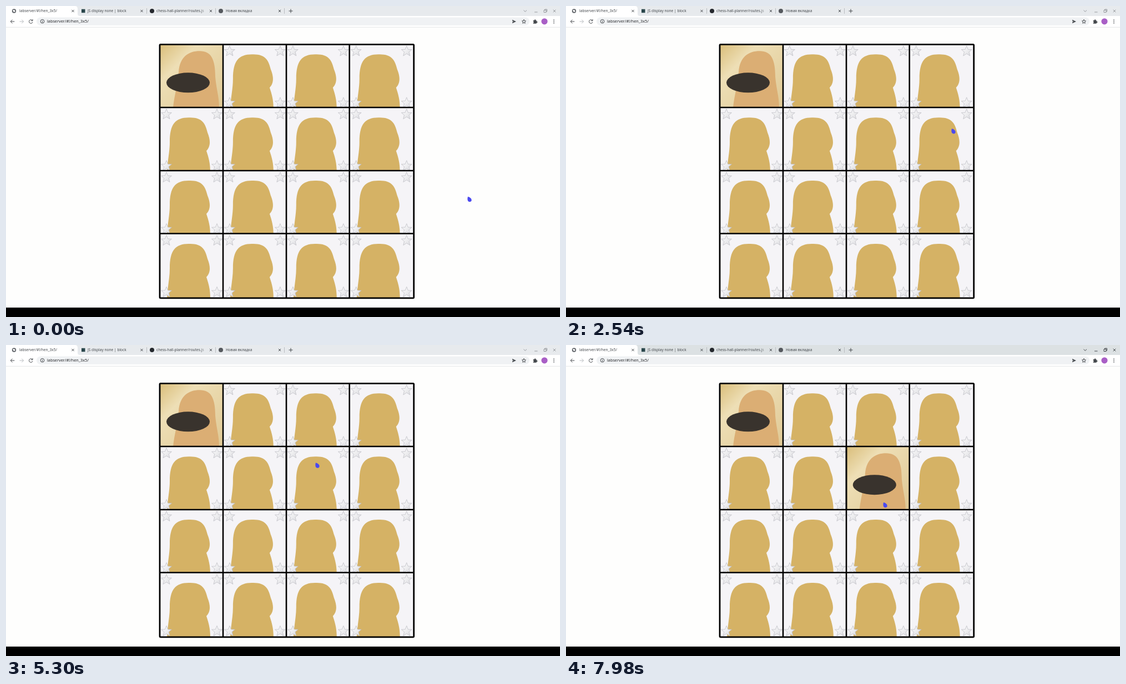
Write an HTML page that moves like this. It is 998 px wide and 561 px high and loops after 8000 ms.

```html
<!DOCTYPE html>
<html lang="ru">
<head>
<meta charset="utf-8">
<style>
  html, body { margin: 0; width: 100%; height: 100%; overflow: hidden; background: #fefefd; }
  svg { display: block; width: 998px; height: 561px; }
  text { font: 6.58px "Noto Sans", sans-serif; fill: #45494d; }
  .url { font-size: 7.25px; fill: #26282b; }
  .line { fill: none; stroke: #43474b; stroke-width: 1; }
  .soft { stroke: #b9bcc0; }
  #strip { fill: #e7eaed; }
  #controls { stroke: #96999d; }
  .focused #strip { fill: #dce1e3; }
  .focused #controls { stroke: #43474b; }
</style>
</head>
<body>
<svg id="stage" viewBox="0 0 998 561">
  <defs>
    <linearGradient id="room" x2="1" y2="1">
      <stop offset="0" stop-color="#d9bd79"/>
      <stop offset=".3" stop-color="#eedfb6"/>
      <stop offset="1" stop-color="#dfc894"/>
    </linearGradient>
    <linearGradient id="silver" x2="1" y2="1">
      <stop offset="0" stop-color="#fff"/>
      <stop offset="1" stop-color="#dcdce0"/>
    </linearGradient>
    <linearGradient id="fade">
      <stop offset="0" stop-color="#fff"/>
      <stop offset=".87" stop-color="#fff"/>
      <stop offset="1" stop-color="#000"/>
    </linearGradient>
    <mask id="titleFade"><rect x="268" width="94" height="18" fill="url(#fade)"/></mask>
    <path id="star" d="M0-9.5 2.6-3 9.4-2.8 4.2 1.6 6 8.5 0 4.7-6 8.5-4.2 1.6-9.4-2.8-2.6-3Z"
      fill="url(#silver)" stroke="#bfbfc6" stroke-width=".8"/>
    <path id="close" class="line" d="M-2.1-2.1 2.1 2.1M2.1-2.1-2.1 2.1"/>
    <g id="back">
      <rect width="117" height="117" fill="#f5f4f7"/>
      <path d="M13 117C14 95 18 80 18 62 18 30 28 18 52 18 76 17 82 28 86 45 93 62 90 72 84 78 88 90 91 100 91 117Z" fill="#d5b265"/>
      <use href="#star" x="12" y="12"/><use href="#star" x="103" y="12"/>
      <use href="#star" x="12" y="105"/><use href="#star" x="103" y="105"/>
    </g>
    <g id="front">
      <rect width="114" height="114" fill="url(#room)"/>
      <path d="M24 114C26 92 32 76 34 50 36 22 52 12 72 12S100 26 100 58C102 82 107 94 107 114Z" fill="#dbae74"/>
      <ellipse cx="51" cy="69" rx="39" ry="18" fill="#39332d"/>
    </g>
  </defs>

  <rect id="strip" width="998" height="18"/>
  <path d="M0 0H124Q129 0 129 5V14Q129 18 133 18H0Z" fill="#fff"/>
  <rect y="18" width="998" height="20" fill="#fff"/>
  <path class="line" style="stroke:#e4e6e8" d="M0 38.3H998"/>
  <rect x="55" y="20.5" width="888" height="14.5" rx="7.2" fill="#f0f2f4"/>
  <path class="line soft" stroke-width=".6" d="M253.5 4V14M377.5 4V14M501.5 4V14"/>

  <circle cx="14.5" cy="9" r="3.7" fill="#5f6368"/>
  <path d="M12 8Q14 6 16 8T14 11Z" fill="#fff"/>
  <rect x="136" y="5.7" width="6.5" height="6.5" fill="#29464b"/>
  <circle cx="263" cy="9" r="4" fill="#24282d"/>
  <circle cx="387" cy="9" r="4" fill="#55595e"/>
  <text x="24" y="11.4">labserver/#!/hen_3x5/</text>
  <text x="147" y="11.4">JS display none | block</text>
  <text x="271" y="11.4" mask="url(#titleFade)">chess-hall-planner/routes.js</text>
  <text x="396" y="11.4">Новая вкладка</text>
  <use href="#close" x="120.5" y="9"/><use href="#close" x="244.5" y="9"/>
  <use href="#close" x="369" y="9"/><use href="#close" x="493" y="9"/>
  <path class="line" d="M509.5 9H516.5M513 5.5V12.5"/>
  <path class="line" id="controls" d="M932.5 7.7 935.2 10.3 938 7.7M952 11H957.5M969 7.5H973V11.5H969ZM970.5 7.5V6H974.5V10H973M985.7 6.7 990.3 11.3M990.3 6.7 985.7 11.3"/>

  <path class="line" d="M15.3 28H8.3M11.5 24.7 8.2 28 11.5 31.3"/>
  <path class="line soft" d="M24.5 28H31.5M28.3 24.7 31.6 28 28.3 31.3"/>
  <path class="line" d="M47.3 25.8A3.3 3.3 0 1 0 48 29M48 24V26.7H45.3"/>
  <circle class="line" stroke-width=".8" cx="65.5" cy="27.7" r="3.3"/>
  <path class="line" d="M65.5 25.7V26.4M65.5 27.2V29.7"/>
  <text class="url" x="74" y="30.4">labserver/#!/hen_3x5/</text>
  <path d="M912 24.8 919 28 912 31.2 912.5 28.6 915.5 28 912.5 27.4Z" fill="#43474b"/>
  <path class="line" stroke-width=".8" d="M933 24.4 934 26.8 936.5 27 934.6 28.7 935.2 31.2 933 29.9 930.8 31.2 931.4 28.7 929.5 27 932 26.8Z"/>
  <path d="M949.8 26H952A1.2 1.2 0 1 1 954.2 26H955.7V28A1.2 1.2 0 1 1 955.7 30V31.7H949.8V30A1 1 0 1 0 949.8 28Z" fill="#43474b"/>
  <circle cx="970" cy="27.8" r="5.6" fill="#a95fc6"/>
  <path d="M987 24.6v1.4M987 27.3v1.4M987 30v1.4" stroke="#43474b" stroke-width="1.4"/>

  <g id="cards"></g>
  <g fill="none" stroke="#000" stroke-width="2.6">
    <path d="M391 70V527M505 70V527M618.7 70V527M277 183H505M618.7 183H735M277 297H735M277 410.5H735"/>
    <path id="edge"/>
    <rect x="277" y="69.3" width="457.7" height="457.5" rx="1.5" stroke-width="2.8"/>
  </g>
  <rect y="544" width="998" height="17"/>
  <path id="cursor" d="M-3-5C0-4.5 4-2 3.7 1.5S-1.5 5.2-3 2.2C-4 0-3.6-3-3-5Z" fill="#4a48f0"/>
</svg>
<script>
const LOOP = 8000, CLICK = 5400;
const SIZE = 4, PITCH = 113.9, LEFT = 277, TOP = 69.3;
const OPEN = 0, CLICKED = 6;
const $ = id => document.getElementById(id);

// Pointer waypoints: time, x, y
const route = [
  [0, 835, 349], [1520, 700, 213], [2500, 698, 226], [3620, 688, 263], [4640, 559, 219],
  [6000, 563, 216], [6840, 560, 219], [7980, 575, 289], [LOOP, 575, 289]
];

const cards = Array.from({ length: SIZE * SIZE }, (_, i) => {
  const card = document.createElementNS("http://www.w3.org/2000/svg", "use");
  card.setAttribute("x", LEFT + i % SIZE * PITCH);
  card.setAttribute("y", TOP + Math.floor(i / SIZE) * PITCH);
  card.setAttribute("href", i === OPEN ? "#front" : "#back");
  return $("cards").appendChild(card);
});

function recorded(t) {
  const phase = (t + 20) % 840;
  return Math.max(0, t - phase + Math.min(740, Math.floor(phase / 40) * 40));
}

function pointerAt(t) {
  const next = Math.max(1, route.findIndex(p => p[0] >= t));
  const [t0, x0, y0] = route[next - 1], [t1, x1, y1] = route[next];
  const k = (t - t0) / (t1 - t0), ease = k * k * (3 - 2 * k);
  return [x0 + (x1 - x0) * ease, y0 + (y1 - y0) * ease];
}

function draw(t) {
  const [x, y] = pointerAt(recorded(t));
  const clicked = t >= CLICK;
  $("cursor").setAttribute("transform", `translate(${x} ${y})`);
  $("stage").classList.toggle("focused", clicked);
  cards[CLICKED].setAttribute("href", clicked ? "#front" : "#back");

  // The freshly opened card sits slightly low and right, then settles into the grid.
  const inset = clicked ? Math.max(0, 2.6 * (1 - (t - CLICK) / 2300)) : 0;
  cards[CLICKED].setAttribute("transform", `translate(0 ${inset})`);
  $("edge").setAttribute("d", `M${505 + inset} 297V${183 + inset}H618.7`);
}

const start = performance.now();
function tick() {
  draw((performance.now() - start) % LOOP);
  requestAnimationFrame(tick);
}
tick();
</script>
</body>
</html>
```
